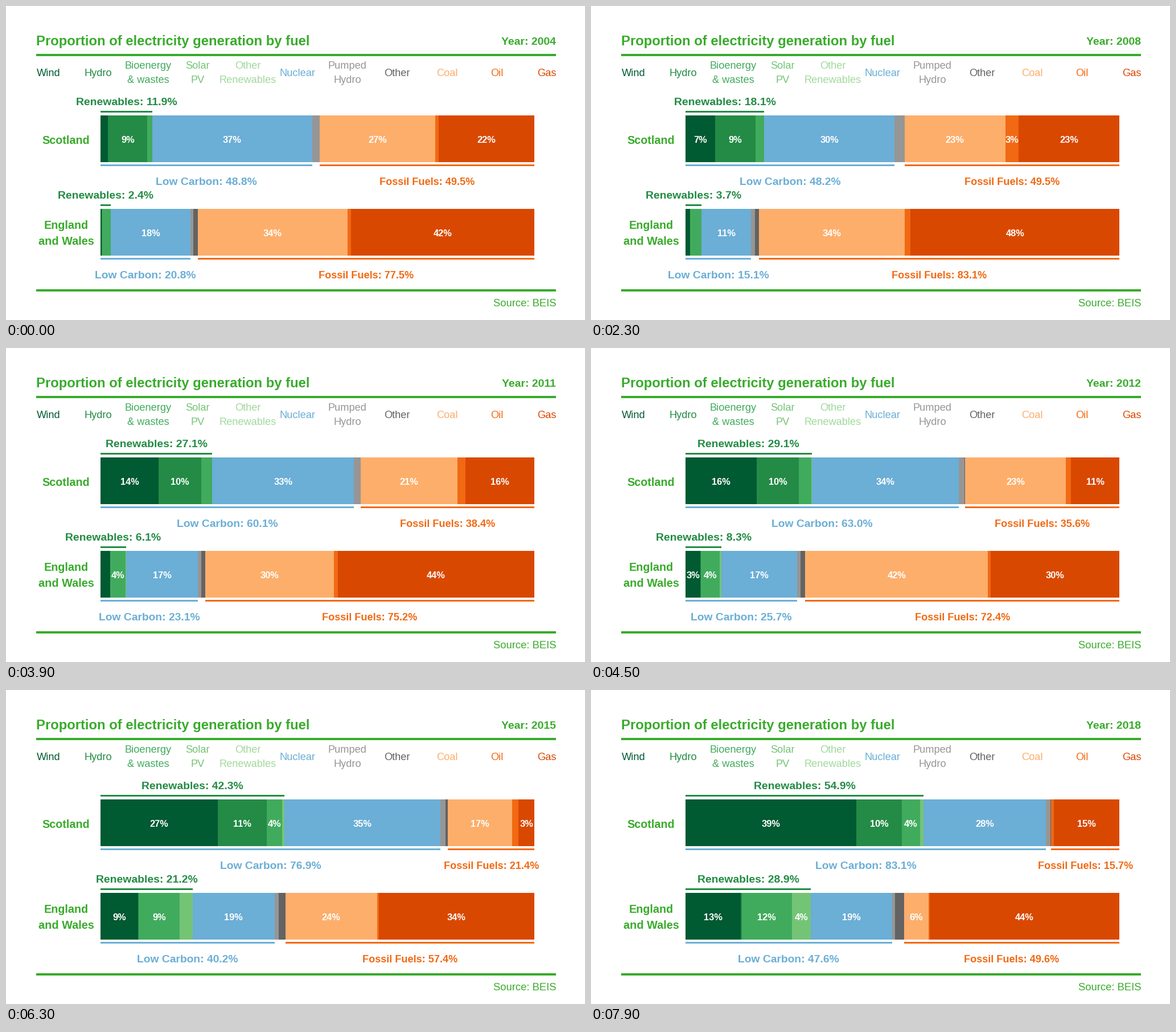
Recreate the animation shown at these times as a matplotlib script. Size 1017 px wide and 551 px high, loop 10 s.

```python
import numpy as np
import matplotlib.pyplot as plt
from matplotlib.animation import FuncAnimation
from matplotlib.patches import Rectangle

W, H, DPI = 1017, 551, 64
FRAMES, MOVING, INTERVAL = 100, 80, 100
YEARS = np.arange(2004, 2019)
X0, SCALE, BAR_H = 166, 7.62, 82
MIN_LABEL = 3

GREEN = "#39ab2c"
RENEWABLE, LOW_CARBON, FOSSIL = "#238b45", "#6baed6", "#f16913"

FUELS = [
    ("Wind", "#005a32"), ("Hydro", "#238b45"), ("Bioenergy\n& wastes", "#41ab5d"),
    ("Solar\nPV", "#74c476"), ("Other\nRenewables", "#a1d99b"), ("Nuclear", "#6baed6"),
    ("Pumped\nHydro", "#969696"), ("Other", "#636363"), ("Coal", "#fdae6b"),
    ("Oil", "#f16913"), ("Gas", "#d94801"),
]
LEGEND_COLORS = [color for _, color in FUELS]

# Percent shares in fuel order, evenly spaced over 2004-2018; gas is the rest.
SCOTLAND = [
    [1.75, 2.6, 3.9, 5.5, 6.8, 9.0, 9.9, 14.1, 16.45, 21, 23.45, 27, 27.3, 34.8, 39.4],
    [9.05, 9.35, 8.1, 9.7, 9.3, 9.5, 6.6, 10.4, 9.65, 8.25, 10.9, 11.3, 11, 10.8, 10.45],
    [1.1, 1.4, 1.5, 1.8, 2, 2.1, 2.7, 2.6, 2.95, 3, 3.45, 3.5, 3.9, 5.2, 4.25],
    [0] * 8 + [.05, .15, .3, .5, .6, .7, .8],
    [0, 0],
    [36.9, 38, 27.1, 25.6, 30.1, 32.6, 30.9, 33, 33.9, 34.9, 33.2, 34.6, 42.8, 36.6, 28.2],
    [1.7, 1.8, 2.3, 1.6, 1.3, 1, 1.3, 1],
    [0, 0, 0, 0, .1, .3, .8, .2],
    [26.7, 24.8, 33, 28.6, 23.2, 23.7, 28.8, 21, 23.3, 20.4, 20.3, 16.9, 3.8, 0, 0],
    [.7, 1, 1.5, 2.3, 3.1, 2.8, 2.6, 1.8, 1.2, 1.4, 1.65, 1.5, 1.4, 1.5, .65],
]
ENGLAND_WALES = [
    [.3, .4, .5, .7, 1, 1.2, 1.5, 2.3, 3.45, 5.2, 6.75, 8.8, 8, 11.1, 12.7],
    [.1, .1, .1, .1, .15, .15, .2, .25],
    [2, 2.3, 2.4, 2.5, 2.6, 2.95, 3.3, 3.6, 4.3, 5.4, 7.3, 9.4, 9.75, 10.35, 11.55],
    [0] * 7 + [.1, .4, .6, 1.4, 2.8, 3.55, 3.8, 4.4],
    [0, 0],
    [18.4, 18, 17.5, 14.7, 11.4, 16.3, 14.4, 17, 17.4, 16.9, 16.8, 19, 18.3, 18.8, 18.7],
    [.6, .8, .9, .7, .8, .9, .9, .7],
    [1.1, .9, .9, .8, 1.1, 1.3, 1.8, 2.1],
    [34.4, 34.5, 37.5, 35, 33.6, 28, 28.2, 30, 42.1, 39.5, 31.4, 23.5, 9.4, 7.5, 5.6],
    [.9, 1.1, 1.4, 1, .7, .4, .35, .3],
]

# Each year lands on a whole frame.
KEYS = np.round(np.arange(len(YEARS)) * (MOVING - 1) / (len(YEARS) - 1))

plt.rcParams["font.family"] = "Liberation Sans"
fig = plt.figure(figsize=(W / DPI, H / DPI), dpi=DPI, facecolor="white")
ax = fig.add_axes([0, 0, 1, 1])
ax.set_xlim(0, W)
ax.set_ylim(H, 0)
ax.axis("off")


def write(x, y, text, size, color, ha="center", weight="bold"):
    return ax.text(x, y, text, fontsize=size * 72 / DPI, color=color,
                   ha=ha, va="baseline", weight=weight)


def box(x, y, w, h, color):
    return ax.add_patch(Rectangle((x, y), w, h, fc=color, ec="none", lw=0))


def yearly(shares):
    """Shares of every fuel by year, with gas filling up to 100."""
    rows = [np.interp(YEARS, np.linspace(YEARS[0], YEARS[-1], len(s)), s) for s in shares]
    return np.array(rows + [100 - np.sum(rows, axis=0)])


class Bar:
    # caption, first fuel, end fuel, colour, offset of rule and text, text size
    GROUPS = [
        ("Renewables", 0, 5, RENEWABLE, -8, -18, 19.4),
        ("Low Carbon", 0, 6, LOW_CARBON, 86, 122, 19.2),
        ("Fossil Fuels", 8, 11, FOSSIL, 86, 122, 18.1),
    ]

    def __init__(self, shares, top):
        self.data = yearly(shares)
        self.parts = [box(X0, top, 0, BAR_H, color) for _, color in FUELS]
        self.rules = [box(X0, top + g[4], 0, 3, g[3]) for g in self.GROUPS]
        self.values = [write(X0, top + 48, "", 16.4, "white") for _ in FUELS]
        self.captions = [write(X0, top + g[5], "", g[6], g[3]) for g in self.GROUPS]

    def update(self, pos):
        shares = np.array([np.interp(pos, np.arange(len(YEARS)), row) for row in self.data])
        shown = self.data[:, int(pos + 0.5)]
        edges = X0 + SCALE * np.concatenate([[0], np.cumsum(shares)])

        for k, (part, value) in enumerate(zip(self.parts, self.values)):
            part.set_x(edges[k])
            part.set_width(edges[k + 1] - edges[k])
            value.set_x((edges[k] + edges[k + 1]) / 2)
            value.set_text(f"{shown[k]:.0f}%" if shown[k] >= MIN_LABEL else "")

        for group, rule, caption in zip(self.GROUPS, self.rules, self.captions):
            name, a, b = group[:3]
            rule.set_x(edges[a])
            rule.set_width(edges[b] - edges[a])
            caption.set_x((edges[a] + edges[b]) / 2)
            caption.set_text(f"{name}: {shown[a:b].sum():.1f}%")


write(53, 69.5, "Proportion of electricity generation by fuel", 23.9, GREEN, "left")
year_text = write(966, 68, "", 19.4, GREEN, "right")
box(53, 84, 913, 4, GREEN)
box(53, 497, 913, 4, GREEN)
write(966, 527, "Source: BEIS", 18.5, GREEN, "right", "normal")

for k, (name, color) in enumerate(FUELS):
    lines = name.split("\n")
    first = 123 if len(lines) == 1 else 110.5
    for n, line in enumerate(lines):
        write(74.5 + 87.5 * k, first + 24.5 * n, line, 18.3, color, weight="normal")

write(105.5, 242, "Scotland", 19.7, GREEN)
write(105.5, 391, "England", 19.7, GREEN)
write(105.5, 419, "and Wales", 19.9, GREEN)

bars = [Bar(SCOTLAND, 192), Bar(ENGLAND_WALES, 356)]


def update(frame):
    step = min(frame, MOVING - 1)
    pos = np.interp(step, KEYS, np.arange(len(YEARS)))
    span = YEARS[-1] - YEARS[0]
    year_text.set_text(f"Year: {YEARS[0] + span * step / (MOVING - 1):.0f}")
    for bar in bars:
        bar.update(pos)
    return []


anim = FuncAnimation(fig, update, frames=FRAMES, interval=INTERVAL,
                     repeat=True, repeat_delay=0, blit=False)
plt.show()
```
